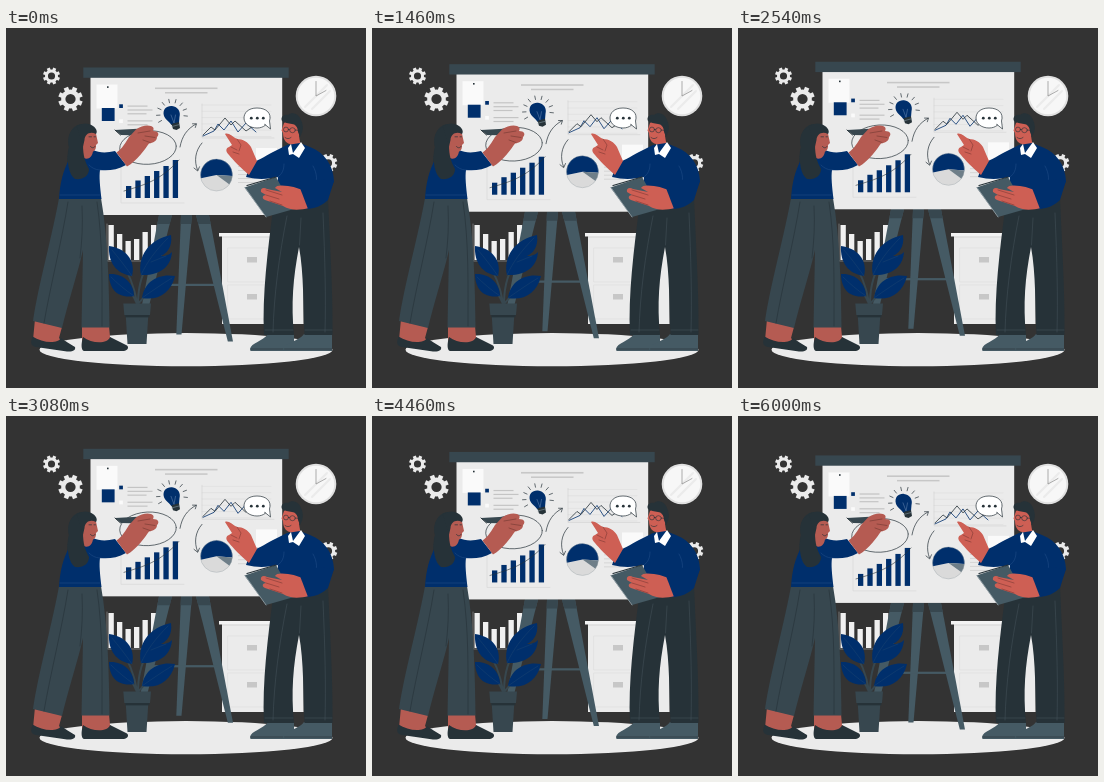
An HTML page with a canvas that plays this animation: 360 px wide and 360 px high, repeating every 6.04 s.

```html
<!DOCTYPE html>
<html lang="en">
<head>
<meta charset="utf-8">
<title>Board presentation</title>
<style>
html, body { margin: 0; width: 100%; height: 100%; overflow: hidden; background: #333; }
canvas { display: block; width: 360px; height: 360px; }
</style>
</head>
<body>
<canvas id="stage"></canvas>
<script>
const LOOP = 6040, LIFT = 6.8;
const BLUE = '#002f6c', INK = '#263238', SLATE = '#37474f', STEEL = '#455a64';
const PALE = '#ebebeb', BACK = '#333333', SKIN_A = '#b55b52', SKIN_B = '#ce5f54';

const canvas = document.getElementById('stage');
const ctx = canvas.getContext('2d');
const ratio = window.devicePixelRatio || 1;
canvas.width = canvas.height = 360 * ratio;
ctx.lineCap = ctx.lineJoin = 'round';

function paint(path, fill, stroke, width = 0.7) {
  if (fill) { ctx.fillStyle = fill; ctx.fill(path); }
  if (stroke) { ctx.strokeStyle = stroke; ctx.lineWidth = width; ctx.stroke(path); }
}
const shape = (d, fill, stroke, width) => paint(new Path2D(d), fill, stroke, width);
const line = (d, color, width) => shape(d, null, color, width);
function box(x, y, w, h, fill) { ctx.fillStyle = fill; ctx.fillRect(x, y, w, h); }
function oval(x, y, rx, ry, fill, stroke, width, turn = 0) {
  const p = new Path2D();
  p.ellipse(x, y, rx, ry, turn, 0, Math.PI * 2);
  paint(p, fill, stroke, width);
}
function wedge(x, y, r, from, to, fill) {
  const p = new Path2D();
  p.moveTo(x, y);
  p.arc(x, y, r, from * Math.PI / 180, to * Math.PI / 180);
  p.closePath();
  paint(p, fill);
}

function gear(x, y, r) {
  ctx.save();
  ctx.translate(x, y);
  ctx.rotate(Math.PI / 8);
  for (let i = 0; i < 8; i++) {
    ctx.rotate(Math.PI / 4);
    box(-r * 0.19, -r, r * 0.38, r * 0.5, PALE);
  }
  ctx.restore();
  oval(x, y, r * 0.77, r * 0.77, PALE);
  oval(x, y, r * 0.42, r * 0.42, BACK);
}

function clock() {
  oval(310, 68, 20.3, 20.3, '#e0e0e0');
  oval(310, 68, 18.3, 18.3, '#f7f7f7');
  line('M299 79L321 57M306 81L324 63', '#ebebeb', 2);
  line('M310 53.5V68L320 62.5', '#8a8a8a', 0.7);
}

function cabinet() {
  box(216, 208, 81.5, 88, PALE);
  box(213, 205, 84.5, 3.5, '#f3f3f3');
  box(216, 208.5, 81.5, 1, '#d6d6d6');
  for (const y of [220, 257]) {
    line(`M222 ${y}H262V${y + 34}H222Z`, '#dedede', 0.7);
    box(241, y + 9, 10, 5.5, '#c7c7c7');
  }
}

function backChart() {
  [197, 206, 213, 211, 204, 197].forEach(
    (y, i) => box(102.5 + i * 8.5, y, 5.3, 232 - y, '#f0f0f0'));
  line('M101 196V233H152', '#bbb', 0.5);
}

function easel() {
  shape('M153 187H166L134 313.5H129Z', STEEL);
  shape('M175 187H186L175.5 306.5H170.3Z', STEEL);
  shape('M190 187H203L227 313.5H221.8Z', STEEL);
  box(146, 255.8, 66, 2.2, STEEL);
  shape('M153 187H166L163.7 196H151.3Z', SLATE);
  shape('M175 187H186L185.2 196H174.6Z', SLATE);
  shape('M190 187H203L204.7 196H192.3Z', SLATE);
  box(84.5, 49, 191.7, 138, PALE);
  box(77.3, 39.5, 205.4, 10.3, SLATE);
}

function bulb() {
  for (let i = 0; i < 9; i++) {
    const a = (150 + i * 27) * Math.PI / 180, c = Math.cos(a), s = Math.sin(a);
    line(`M${166 + 12 * c} ${86.5 + 12 * s}L${166 + 15.5 * c} ${86.5 + 15.5 * s}`, INK, 0.7);
  }
  shape('M158 88C156 81 161 77.5 166 78C172 78.5 175 84 173.5 89L173 95L165.5 97C163 93 159.5 92 158 88Z', BLUE);
  shape('M165.5 96L173 94L174 100L170.5 102L167 101Z', INK);
  line('M166 98.5L173.5 96.5', '#8395a0', 0.6);
  line('M165 87L168 95L169.5 87', '#6f8db5', 0.5);
}

function boardContent() {
  box(149, 59.5, 62.5, 1.6, '#c7c7c7');
  box(159, 64, 42.5, 1.5, '#c7c7c7');

  box(90.5, 56.5, 21, 24, '#fafafa');
  box(101, 58.3, 1.6, 1.6, INK);
  box(95.8, 80, 12.8, 13, BLUE);
  box(113.2, 76.3, 3.7, 3.7, BLUE);
  box(113.2, 91.3, 3.7, 3.7, '#fafafa');
  [[77.5, 20], [81.4, 25], [85.2, 19], [92.3, 25], [96.2, 20]].forEach(
    ([y, w]) => box(121.5, y, w, 1.2, '#c4c4c4'));

  bulb();
  line('M174 119C176 108 181 101 190 96M186.5 95.8L190.5 95.8L189.3 99.5', INK, 0.7);
  line('M196 115C189 123 188 133 191.5 142M188 140L191.7 143L193.5 138.8', INK, 0.7);
  oval(142, 119.5, 28.3, 16.8, null, INK, 0.7, -0.05);

  line('M115 128V175H178', '#d5d5d5', 0.6);
  [158, 152.5, 148, 143, 138, 132].forEach(
    (y, i) => box(120 + i * 9.35, y, 5.3, 170 - y, BLUE));
  line('M118 163C138 157 154 153 173 132', INK, 0.6);

  for (let i = 0; i < 6; i++) line(`M196 ${77 + i * 6.3}H265`, '#d9d9d9', 0.5);
  line('M196 76V110H268', '#d0d0d0', 0.6);
  line('M197 108L208 103L212 96L218 102L225 93L232 104L240 95L250 104', BLUE, 0.8);
  line('M197 107L205 99L209 102L219 90L225 97L229 93L240 103L249 97', INK, 0.8);

  wedge(210.5, 147, 16, 36, 168, '#dadada');
  wedge(210.5, 147, 16, 168, 364, BLUE);
  wedge(210.5, 147, 16, 4, 36, '#6e7e88');
  oval(210.5, 147, 16, 16, null, '#9aa4aa', 0.4);

  box(250, 120, 21, 18, '#fafafa');
  for (let i = 0; i < 5; i++) box(232, 138 + i * 4, i % 2 ? 15 : 20, 0.9, '#d3d3d3');
}

function bubble() {
  shape('M259 96.5L264.5 101L263.5 93C266 85 260 80 251 80C242 80 238 85 238 90C238 96 244 100 251 100C254.5 100 257 99 259 97.5Z', '#fff', INK, 0.7);
  for (const x of [245.3, 251.3, 257.3]) oval(x, 90.2, 1.4, 1.4, INK);
}

function leaf(d, vein) {
  shape(d, BLUE);
  line(vein, '#1d4470', 0.5);
}
function plant() {
  line('M132 277C132 262 134 250 143 233M131 275C128 256 122 243 113 230M131 276C128 268 122 260 113 255M132 276C138 268 146 263 157 256', SLATE, 2);
  leaf('M135 247C131 229 143 211 165 207C167 219 160 226 155 228C161 228 164 226 166 224C165 240 152 248 135 247Z', 'M135 247C141 234 149 223 162 210M145 234L160 228');
  leaf('M126 248C110 246 102 234 103 218C119 220 130 232 126 248Z', 'M126 248C119 238 112 229 106 222');
  leaf('M128 268C112 271 103 261 103 246C117 245 128 255 128 268Z', 'M128 268C119 262 111 255 105 249');
  leaf('M136 270C138 254 152 245 169 248C165 265 152 273 136 270Z', 'M136 270C146 263 156 256 166 250');
  shape('M119.5 284H142.5L140.5 316H121.5Z', SLATE);
  shape('M117.3 275.5H145L144 287H118.3Z', SLATE);
  box(119.3, 287, 24, 2.4, INK);
}

function woman() {
  shape('M29 291L56 299L53 310L60 318L27 312Z', SKIN_A);
  shape('M76 298H103L104 309L113 318H76Z', SKIN_A);
  shape('M26.5 308.5C24 315 25 318 30 319L61 323.5C67 324 70 322 69 319C64 316 59 313 55 310C52 316 36 315 26.5 308.5Z', INK);
  shape('M77 309C75 316 75 322 78 323H118C123 322 123 318 120 317L104 309C102 316 86 316 77 309Z', INK);

  shape('M53 170C46 209 32 258 27 293L56 300C63 271 72 244 77 222L75.5 299.5H103.5C103 257 102 210 95 170Z', SLATE);
  line('M76 178C77 197 76 213 74 230M62 174C56 212 44 260 38 295M91 174C97 214 96 258 96 298', INK, 0.6);

  shape('M77 96C66 96 61 107 63 119C59 134 62 146 69 151C78 153 86 145 84 126Z', INK);
  shape('M77 117L87 121L88 132L76 134Z', SKIN_A);
  shape('M64 130C57 142 54 155 53 171H95.5C94 158 93 149 94 142C102 143 111 142 120 137L109 123C101 125 93 125 87 122C87 131 79 133 76 128Z', BLUE);
  shape('M76 104C82 99 90 100 90.5 108L92 115L90 117C90.5 123 86 126 81 123L75 119Z', SKIN_A);
  shape('M66 106C69 95 81 93 87 98C91 101 91.5 104 90 106C84 103 79 106 78.5 112L76.5 121L66 122Z', INK);
  shape('M71 99C63 102 61 110 63 119C60 134 63 147 69 151C77 152 83 148 83 141C79 134 77 127 77 117Z', INK);
  line('M83 108.8H85.5M88 108.8H89.5M84.5 118.5C86 120.5 88 120 89 118.5', INK, 0.7);
  line('M83 137C87 141 91 142 95 142M54 167H94', '#24518b', 0.5);

  shape('M109 102L136 100.5L141 104L136 107.5L115 107Z', SLATE);
  line('M109 102L114.5 107', INK, 1);
  shape('M110.5 124.5C116 121 120 114 123 109L130 101.5C135 98 141 96.5 145 98C148 99 148 101 147 103C152 103 154 106 151 109C151 113 147 115 143 115.5C139 121 131 133 121 138.5Z', SKIN_A);
  line('M132 105L144 103M139 108L149 109.5M137 112L144 114.5', '#713832', 0.6);
}

function man() {
  shape('M262 306C257 313 245 315 244 321L244.5 323H279L288 316V306Z', STEEL);
  shape('M298 306C293 313 279 315 277.5 321V323H326V306Z', STEEL);
  line('M245 321H277M278.5 321H326', INK, 0.6);
  shape('M267 181C262 221 256 266 258 307H288C285 276 287 250 293 219C298 246 297 278 298.5 307H326.5C327 264 324 219 322 170H290Z', INK);
  line('M295 190L293.5 217M281 188C273 228 268 267 267 304M317 185C319 232 320 270 319 304M259 302H287M299 302H326', '#46545d', 0.5);

  shape('M283 108L293 108L296 125L286 128Z', SKIN_B);
  shape('M281 117L267 124C258 129 251 133 245 135L240 149C252 152 263 151 272 149L271 172L300 181C309 181 317 177 322 172L328 153C327 137 319 125 304 119L294 115Z', BLUE);
  shape('M285 116L287 125L295 114L299 120L293 130L287 126L283 127L282 120Z', '#fff');
  shape('M278 95C284 89 293 92 294 101C294 110 290 116 284 116C279 115 277 110 277 105L275.5 102.5Z', SKIN_B);
  shape('M276 93C274 88 279 86 282 87C286 83 293 86 295 92C298 98 297 104 294 109L292 104C292 99 289 96 286 96C282 95 279 95 276 93Z', INK);
  oval(280, 101.5, 2.5, 2.4, null, INK, 0.6);
  oval(286.5, 102.2, 2.8, 2.5, null, INK, 0.6);
  line('M282.5 101.5H283.5M289.4 102L293 102.5M279 109.5C281 111 283 111 285 109.5', INK, 0.6);
  line('M272 149C276 146 278 142 278 136M307 138C311 145 312 153 308 161', '#24518b', 0.5);

  shape('M219 106C222 104 227 109 231 111C237 111 242 114 245 119L251 133L243 147C234 139 227 132 223 127C219 123 220 120 223 119L226 117Z', SKIN_B);
  line('M225 119L231 122M227 124L233 126M231 111L235 117L233 123', '#803a35', 0.6);

  shape('M238.5 159.5L270 149L288 181L260 189Z', STEEL);
  line('M239 159.5L260 189', '#9aa6ad', 0.8);
  line('M241 157.5L270 149', INK, 1.2);
  shape('M303 180C294 182 285 183 277 178L259 172C255 170 257 167 260 167L255 164C254 160 258 159 261 161L276 164L269 160C270 157 276 157 282 158C290 159 296 162 303 164Z', SKIN_B);
  line('M260 167L273 171M260 162L276 167M264 173L276 177', '#803a35', 0.6);
  shape('M312 151L294 160L302 181C312 176 323 167 328 153Z', BLUE);
}

function draw(t) {
  const phase = (t % LOOP) / LOOP;
  const rise = LIFT * (1 - Math.abs(1 - 2 * phase));
  ctx.setTransform(ratio, 0, 0, ratio, 0, 0);
  box(0, 0, 360, 360, BACK);
  oval(180, 321.7, 146.5, 16.6, PALE);
  gear(45.5, 48, 8.5);
  gear(64.5, 71, 12.2);
  gear(322.3, 135, 9);
  clock();
  cabinet();
  backChart();
  ctx.save();
  ctx.translate(0, -rise);
  easel();
  boardContent();
  ctx.restore();
  bubble();
  plant();
  woman();
  man();
}

const start = performance.now();
function tick(now) {
  draw(Math.max(0, now - start));
  requestAnimationFrame(tick);
}
draw(0);
requestAnimationFrame(tick);
</script>
</body>
</html>
```
